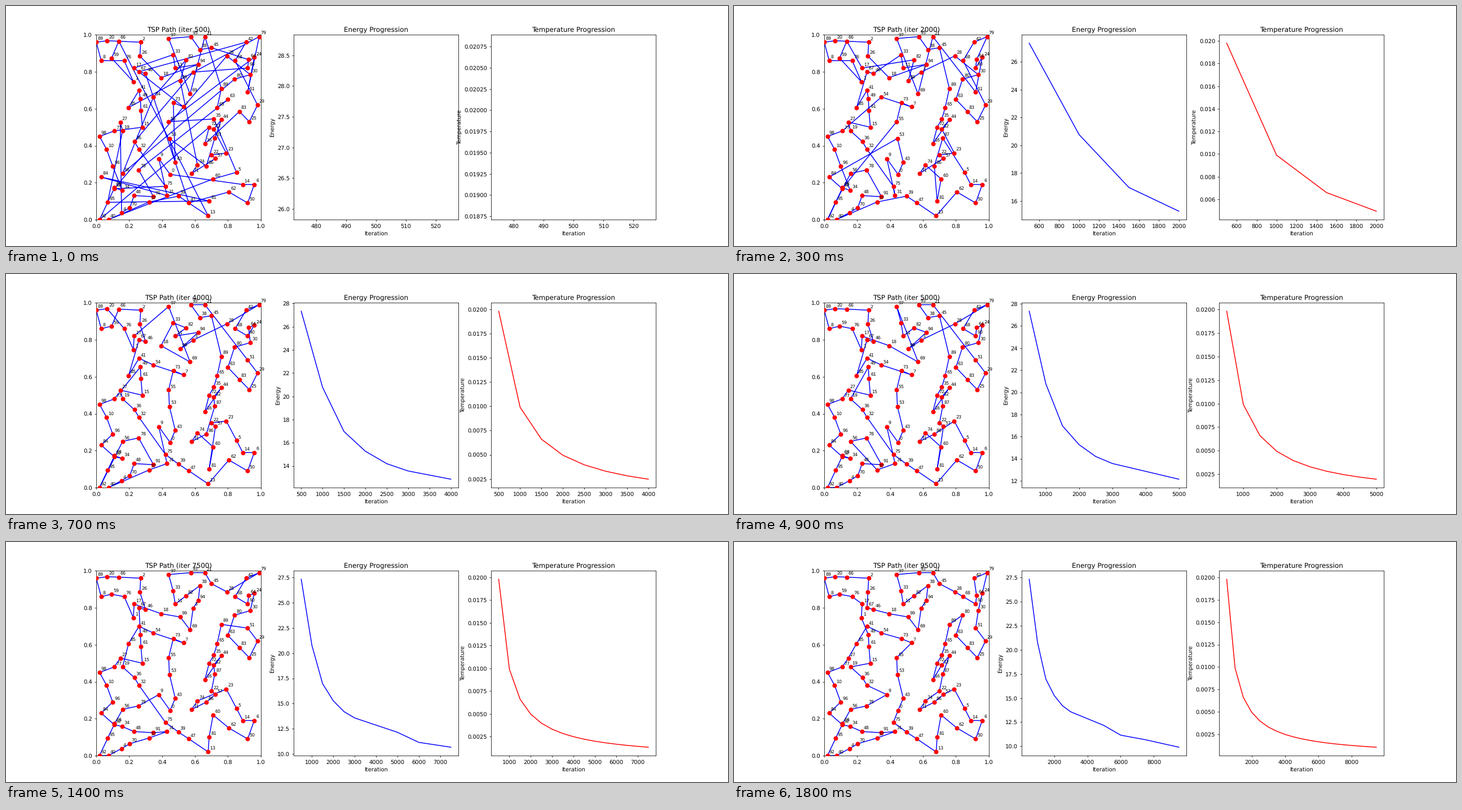
A matplotlib script for the animation above (1900 ms loop, 1280 by 427 pixels).

```python
import random

import matplotlib.pyplot as plt
import numpy as np
from matplotlib.animation import FuncAnimation

DPI = 640 / 9
CITIES = 100
FRAMES = 19
ITERS = 500 * np.arange(1, FRAMES + 1)

plt.rcParams["text.hinting"] = "none"
rng = random.Random(7)

# Turning points of the shortest tour, in visiting order.
CORNERS = [
    (0, .96), (.27, .96), (.26, .8), (.51, .75), (.57, .68), (.62, .84),
    (.63, .92), (.48, .82), (.44, .98), (.66, .99), (.7, .93), (.92, .82),
    (.91, .96), (.99, .99), (.92, .69), (.98, .62), (.93, .53), (.8, .65),
    (.84, .76), (.76, .71), (.66, .41), (.76, .54), (.7, .35), (.58, .25),
    (.79, .36), (.89, .19), (.96, .19), (.92, .09), (.71, .22), (.68, .02),
    (.42, .18), (.48, .31), (.44, .53), (.53, .61), (.26, .7), (.11, .48),
    (.02, .45), (.1, .29), (.03, .23), (.23, .13), (.43, .13), (.02, 0),
    (.16, .25), (.38, .33), (.26, .38), (.16, .48), (.28, .5), (.23, .82),
    (.17, .86), (.03, .86),
]

# Energy falls steeply, then levels off.
KNOTS = [500, 1000, 1500, 2000, 2500, 3000, 5000, 6000, 7500, 9500]
LEVELS = [27.33, 20.77, 16.97, 15.27, 14.2, 13.57, 12.15, 11.15, 10.67, 9.9]
ENERGY = np.interp(ITERS, KNOTS, LEVELS)
TEMPS = 9.9 / ITERS


def place_cities():
    """Split the longest leg, slightly off the line, until all cities exist."""
    points = np.array(CORNERS, float)
    while len(points) < CITIES:
        legs = np.roll(points, -1, axis=0) - points
        k = np.argmax(np.hypot(*legs.T))
        wobble = [rng.gauss(0, .01), rng.gauss(0, .01)]
        point = points[k] + legs[k] * rng.uniform(.35, .65) + wobble
        points = np.insert(points, k + 1, point, axis=0)
    return points.clip(0, .99)


X, Y = place_cities().T
DIST = np.hypot(X[:, None] - X, Y[:, None] - Y).tolist()
LABELS = rng.sample(range(CITIES), CITIES)


def length(tour):
    return sum(DIST[a][b] for a, b in zip(tour, tour[1:] + tour[:1]))


def loosen(tour, target):
    """Reverse random stretches that lengthen the tour up to the target."""
    tour = list(tour)
    slack = target - length(tour)
    for _ in range(4000):
        if slack < .02:
            break
        i, j = sorted(rng.sample(range(1, CITIES), 2))
        a, b, c, d = tour[i - 1], tour[i], tour[j], tour[(j + 1) % CITIES]
        gain = DIST[a][c] + DIST[b][d] - DIST[a][b] - DIST[c][d]
        if 0 < gain <= slack:
            tour[i:j + 1] = tour[i:j + 1][::-1]
            slack -= gain
    return tour


def build_tours():
    """Run the cooling backwards, from the best tour to the first one."""
    tours = [list(range(CITIES))]
    scale = length(tours[0]) / ENERGY[-1]
    for energy in ENERGY[-2::-1]:
        tours.append(loosen(tours[-1], energy * scale))
    return tours[::-1]


TOURS = build_tours()

# The small surplus keeps the pixel size from rounding down.
fig, (path_ax, energy_ax, temp_ax) = plt.subplots(
    1, 3, figsize=(1280.001 / DPI, 427.001 / DPI), dpi=DPI)

path_ax.set(xlim=(0, 1), ylim=(0, 1))
path_line, = path_ax.plot([], [], "b-")
path_ax.scatter(X, Y, s=50, c="red", zorder=3)
for x, y, label in zip(X, Y, LABELS):
    path_ax.text(x + .01, y + .01, str(label), fontsize=8)


def chart(ax, values, count, color, name):
    ax.cla()
    ax.plot(ITERS[:count], values[:count], color=color)
    ax.set(title=f"{name} Progression", xlabel="Iteration", ylabel=name)


def draw(frame):
    loop = TOURS[frame] + TOURS[frame][:1]
    path_line.set_data(X[loop], Y[loop])
    path_ax.set_title(f"TSP Path (iter {ITERS[frame]})")
    chart(energy_ax, ENERGY, frame + 1, "blue", "Energy")
    chart(temp_ax, TEMPS, frame + 1, "red", "Temperature")


anim = FuncAnimation(fig, draw, frames=FRAMES, init_func=lambda: None,
                     interval=100, repeat=True, repeat_delay=0)
plt.show()
```
